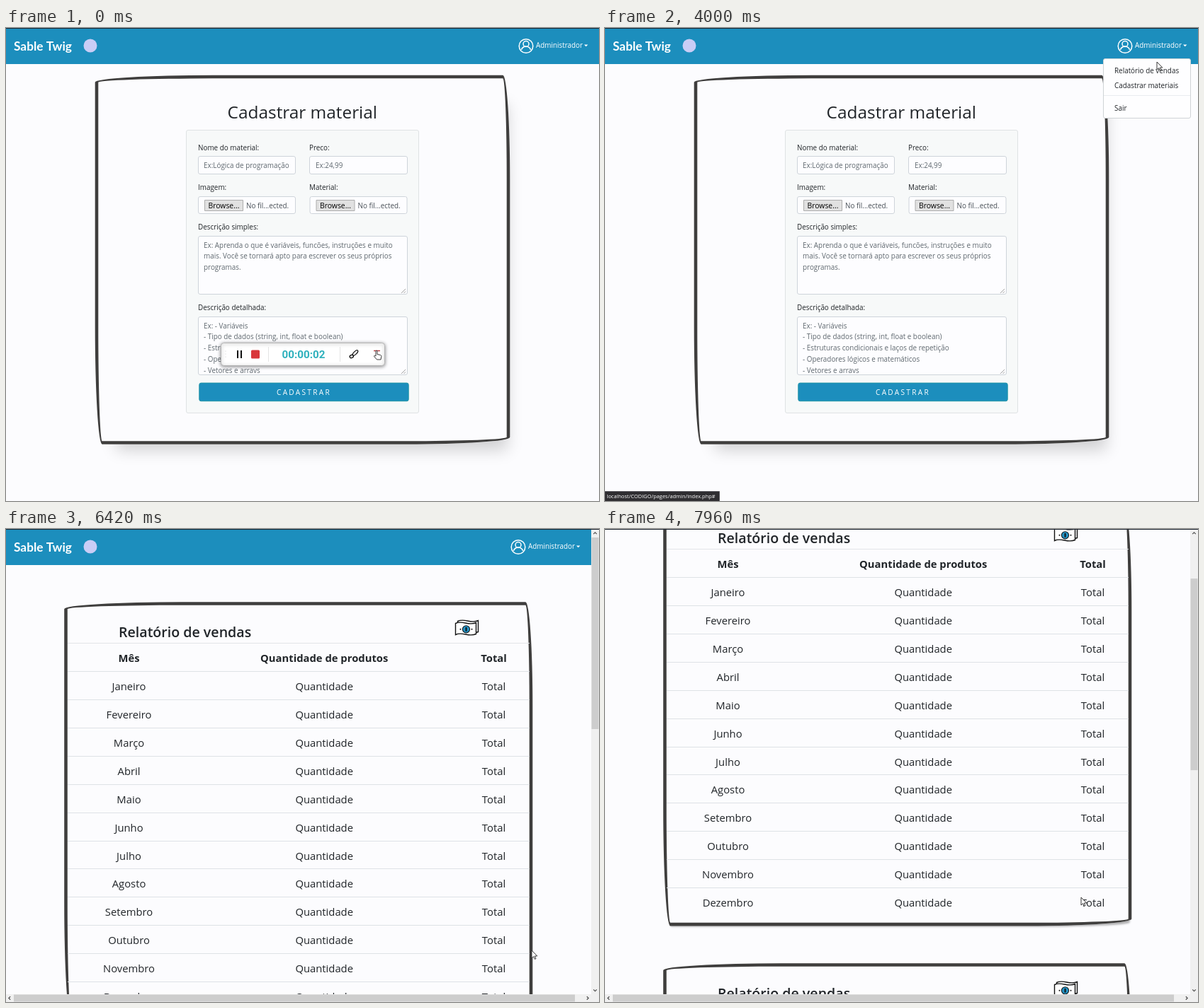
An HTML page with a canvas that plays this animation: 837x669 px, repeating every 8000 ms.

```html
<!DOCTYPE html>
<html lang="pt-BR">
<head>
<meta charset="utf-8">
<title>Painel administrativo</title>
<style>
  html, body { margin: 0; width: 100%; height: 100%; overflow: hidden; background: #fcfcfe; }
  canvas { display: block; }
</style>
</head>
<body>
<canvas id="stage" width="837" height="669"></canvas>
<script>
const ctx = document.getElementById('stage').getContext('2d');
const W = 837, H = 669, LOOP = 8000;
const BLUE = '#1c8ebd', PAGE = '#fcfcfe', INK = '#212529', MUTED = '#5f686f', SKETCH = '#3f3e3d';
const SANS = '"Open Sans", "Noto Sans", sans-serif';
const BODY = 9.88, CELL = 14.8, ROW = 39.85;

// Screen refreshes: first, last, count (evenly spaced)
const REFRESH = [
  [170, 540, 4], [750, 1170, 5], [1380, 1710, 4], [2250, 2840, 6], [3000, 3790, 8],
  [3920, 4000, 2], [4170, 4500, 4], [4710, 4960, 3], [5130, 5130, 1], [5290, 5290, 1],
  [5460, 5840, 4], [6000, 6000, 1], [6210, 6210, 1], [6420, 6420, 1], [6630, 6630, 1],
  [6880, 6880, 1], [7500, 7500, 1], [7750, 7750, 1], [7960, 7960, 1]
];

// Pointer path: time, x, y
const POINTER = [
  [0, 523, 456], [540, 523, 456], [750, 530, 448], [1170, 597, 412], [1710, 690, 246],
  [2130, 690, 246], [2486, 768, 66], [2604, 776, 42], [2840, 785, 24], [3790, 785, 32],
  [4000, 779, 48], [4250, 778, 57], [4500, 774, 58], [5290, 774, 58], [5460, 774, 66],
  [5840, 772, 250], [6000, 785, 425], [6210, 748, 585], [6420, 742, 596], [6630, 742, 600],
  [6880, 672, 521], [8000, 672, 521]
];

const STATUS = [
  [0, ''], [2720, 'localhost/CODIGO/pages/admin/index.php#'],
  [4250, 'localhost/CODIGO/pages/admin/vendas.php'],
  [4710, 'Aguardando localhost...', 172],
  [4830, 'Transferindo dados de localhost...', 172],
  [4960, 'Leu code.jquery.com', 172],
  [5130, 'Leu stackpath.bootstrapcdn.com', 172], [5290, '']
];

const MONTHS = ['Janeiro', 'Fevereiro', 'Março', 'Abril', 'Maio', 'Junho', 'Julho',
  'Agosto', 'Setembro', 'Outubro', 'Novembro', 'Dezembro'];

function heldTime(t) {
  let last = 0;
  for (const [a, b, n] of REFRESH)
    for (let i = 0; i < n; i++) {
      const s = n > 1 ? a + (b - a) * i / (n - 1) : a;
      if (s <= t) last = s;
    }
  return last;
}

function pointerAt(t) {
  const i = POINTER.findIndex(k => k[0] > t);
  const [t0, x0, y0] = POINTER[i - 1], [t1, x1, y1] = POINTER[i];
  const k = (t - t0) / (t1 - t0);
  return [Math.round(x0 + (x1 - x0) * k), Math.round(y0 + (y1 - y0) * k)];
}

function text(str, x, y, o = {}) {
  ctx.font = `${o.weight || 400} ${o.size || BODY}px ${o.font || SANS}`;
  ctx.fillStyle = o.color || INK;
  ctx.textAlign = o.align || 'left';
  ctx.letterSpacing = o.spacing || '0px';
  ctx.fillText(str, x, y);
  ctx.letterSpacing = '0px';
}

function rect(x, y, w, h, color) {
  ctx.fillStyle = color;
  ctx.fillRect(x, y, w, h);
}

function panel(x, y, w, h, r, fill, border) {
  ctx.beginPath();
  ctx.roundRect(x + .5, y + .5, w - 1, h - 1, r);
  ctx.fillStyle = fill;
  ctx.fill();
  ctx.lineWidth = 1;
  ctx.strokeStyle = border;
  ctx.stroke();
}

function stroke(color, width, draw) {
  ctx.beginPath();
  draw();
  ctx.strokeStyle = color;
  ctx.lineWidth = width;
  ctx.stroke();
}

function line(x0, y0, x1, y1, color, width = 1) {
  stroke(color, width, () => { ctx.moveTo(x0, y0); ctx.lineTo(x1, y1); });
}

function disc(x, y, r, color) {
  ctx.beginPath();
  ctx.arc(x, y, r, 0, Math.PI * 2);
  ctx.fillStyle = color;
  ctx.fill();
}

// Box with uneven elliptical corners, optionally inset
function wobbly(x, y, w, h, inset = 0) {
  const q = Math.PI / 2, r = v => Math.max(0, v - inset);
  const long = r(166), mid = r(146), short = r(10);
  x += inset; y += inset; w -= 2 * inset; h -= 2 * inset;
  ctx.moveTo(x + long, y);
  ctx.ellipse(x + w - short, y + mid, short, mid, 0, -q, 0);
  ctx.ellipse(x + w - mid, y + h - short, mid, short, 0, 0, q);
  ctx.ellipse(x + short, y + h - long, short, long, 0, q, 2 * q);
  ctx.ellipse(x + long, y + short, long, short, 0, 2 * q, 3 * q);
  ctx.closePath();
}

function sketchBox(x, y, w, h, [dx, dy, blur, spread, alpha]) {
  const far = 2000;
  ctx.save();
  ctx.shadowColor = `rgba(0,0,0,${alpha})`;
  ctx.shadowBlur = blur;
  ctx.shadowOffsetX = far + dx;
  ctx.shadowOffsetY = dy;
  ctx.beginPath();
  wobbly(x - far, y, w, h, spread);
  ctx.fillStyle = '#000';
  ctx.fill();
  ctx.restore();
  ctx.beginPath();
  wobbly(x, y, w, h);
  ctx.fillStyle = PAGE;
  ctx.fill();
  ctx.beginPath();
  wobbly(x, y, w, h);
  wobbly(x, y, w, h, 4.57);
  ctx.fillStyle = SKETCH;
  ctx.fill('evenodd');
}

function navbar(width) {
  rect(0, 0, width, 51, BLUE);
  text('Sable Twig', 11, 32, { size: 17.3, weight: 700, color: '#fff', font: 'Lato, sans-serif' });
  disc(119, 25, 9.5, '#c9cdf6');
  const x = width - 103;
  stroke('#fff', 1.5, () => ctx.arc(x, 25.5, 9.8, 0, 7));
  stroke('#fff', 1.5, () => ctx.arc(x, 22.5, 4, 0, 7));
  stroke('#fff', 1.5, () => ctx.arc(x, 33, 7, Math.PI * 1.1, Math.PI * 1.9));
  text('Administrador', x + 14, 28, { color: '#fff' });
  ctx.beginPath();
  ctx.moveTo(x + 82, 23.5);
  ctx.lineTo(x + 87.4, 23.5);
  ctx.lineTo(x + 84.7, 26.3);
  ctx.fillStyle = '#fff';
  ctx.fill();
}

function field(x, y, w, h) {
  panel(x, y, w, h, 2.5, '#fdfdff', '#ced4da');
}

function fileField(x) {
  field(x, 238, 138, 25);
  panel(x + 9, 243, 55, 16, 0, '#e1e1e1', '#adadad');
  text('Browse...', x + 36.5, 254.5, { size: 10.4, weight: 500, color: '#000', align: 'center' });
  text('No fil...ected.', x + 68, 254.5, { color: '#495057' });
}

function textarea(y, lines) {
  field(271, y, 296, 83);
  ctx.save();
  ctx.beginPath();
  ctx.rect(272, y, 290, 80);
  ctx.clip();
  lines.forEach((s, i) => text(s, 279, y + 16.7 + i * 15.7, { color: MUTED }));
  ctx.restore();
  line(558, y + 81, 564, y + 75, '#8a8a8a', .8);
  line(561.5, y + 81, 564, y + 78.5, '#8a8a8a', .8);
}

function formPage() {
  navbar(W);
  sketchBox(125.7, 66.8, 585.6, 522, [13, 25, 22, 17, .18]);
  text('Cadastrar material', 418.3, 128.3, { size: 24.4, align: 'center' });
  panel(254, 144, 329, 401, 2.5, '#f7f9f9', '#dfe2e4');
  text('Nome do material:', 271, 172.5);
  text('Preco:', 428, 172.5);
  field(271, 181, 138, 26);
  field(428, 181, 139, 26);
  text('Ex:Lógica de programação', 279, 198, { color: MUTED });
  text('Ex:24,99', 437, 198, { color: MUTED });
  text('Imagem:', 271, 228.5);
  text('Material:', 428, 228.5);
  fileField(271);
  fileField(428.5);
  text('Descrição simples:', 271, 285);
  textarea(294, [
    'Ex: Aprenda o que é variáveis, funcões, instruções e muito',
    'mais. Você se tornará apto para escrever os seus próprios',
    'programas.'
  ]);
  text('Descrição detalhada:', 271, 399);
  textarea(408, [
    'Ex: - Variáveis',
    '- Tipo de dados (string, int, float e boolean)',
    '- Estruturas condicionais e laços de repetição',
    '- Operadores lógicos e matemáticos',
    '- Vetores e arrays'
  ]);
  panel(272.3, 501.6, 296.4, 26.6, 2.5, BLUE, '#2195a6');
  text('CADASTRAR', 382, 519.3, { size: 10.1, color: '#fff', spacing: '2.3px' });
}

function recorder() {
  ctx.save();
  ctx.shadowColor = 'rgba(0,0,0,.45)';
  ctx.shadowBlur = 5;
  ctx.shadowOffsetY = 1;
  panel(303, 445, 232, 33, 4, '#fff', '#b5b5b5');
  ctx.restore();
  for (let i = 0; i < 3; i++) disc(310, 457 + i * 4, .6, '#ccc');
  rect(326, 456, 2, 11, '#111');
  rect(331, 456, 2, 11, '#111');
  ctx.beginPath();
  ctx.roundRect(346, 455.5, 12, 12, 1.5);
  ctx.fillStyle = '#d8373b';
  ctx.fill();
  line(370.5, 451, 370.5, 472, '#e4e4e4');
  line(471.5, 451, 471.5, 472, '#e4e4e4');
  text('00:00:02', 420, 467, { size: 15.2, weight: 700, color: '#2fb1bd', align: 'center', font: 'Roboto, sans-serif' });
  stroke('#111', 1.3, () => ctx.ellipse(493, 459.5, 4.8, 2, -Math.PI / 4, 0, 7));
  stroke('#111', 1.3, () => ctx.ellipse(487.8, 464.5, 2.7, 2, -.4, 0, 7));
  line(519, 456.5, 528, 456.5, '#b8474a', 1.5);
}

function dropdown() {
  panel(703, 43, 124, 85, 2.5, '#fefeff', '#cfd3d6');
  text('Relatório de vendas', 719, 63.5);
  text('Cadastrar materiais', 719, 84.5);
  line(704, 95.5, 826, 95.5, '#e9ecef');
  text('Sair', 719, 116.5);
}

function banknote(x, y) {
  const wave = (dx, dy) => {
    ctx.beginPath();
    ctx.moveTo(x + dx, y + dy + 3);
    ctx.bezierCurveTo(x + dx + 10, y + dy - 2, x + dx + 18, y + dy + 7, x + dx + 29, y + dy + 2);
    ctx.lineTo(x + dx + 29, y + dy + 18);
    ctx.bezierCurveTo(x + dx + 18, y + dy + 23, x + dx + 10, y + dy + 14, x + dx, y + dy + 19);
    ctx.closePath();
    ctx.fillStyle = '#fff';
    ctx.fill();
    ctx.strokeStyle = '#111';
    ctx.lineWidth = 1.4;
    ctx.stroke();
  };
  wave(3.5, -.5);
  wave(.5, 2.5);
  disc(x + 15.5, y + 13.8, 5.6, '#111');
  disc(x + 15.5, y + 13.8, 4.6, '#2492c4');
  line(x + 15.5, y + 11, x + 15.5, y + 16.6, '#111', 2);
  disc(x + 7.5, y + 13.8, 1, '#111');
  disc(x + 23.5, y + 13.8, 1, '#111');
}

function report(top) {
  sketchBox(82.2, top + .2, 661.1, 591.2, [1.3, 5.2, 2.6, 4, .3]);
  text('Relatório de vendas', 159, top + 50.4, { size: 19.6, weight: 600 });
  banknote(634, top + 25);
  const row = (cells, y, weight) => cells.forEach((s, i) =>
    text(s, [173.5, 449.2, 688.5][i], y, { size: CELL, weight, align: 'center' }));
  line(87, top + 58.5, 739, top + 58.5, '#e3e5e8');
  row(['Mês', 'Quantidade de produtos', 'Total'], top + 85.2, 700);
  MONTHS.forEach((m, i) => {
    const y = top + Math.floor(98.9 + i * ROW) + .5;
    line(87, y, 739, y, '#dee2e6');
    row([m, 'Quantidade', 'Total'], top + 125.4 + i * ROW);
  });
}

function chevron(x, y, angle) {
  ctx.save();
  ctx.translate(x, y);
  ctx.rotate(angle);
  stroke('#505050', 1.2, () => { ctx.moveTo(-2.3, 1.2); ctx.lineTo(0, -1.2); ctx.lineTo(2.3, 1.2); });
  ctx.restore();
}

function scrollbars(scroll) {
  rect(826, 0, 11, H, '#f0f0f0');
  rect(0, 658, W, 11, '#f0f0f0');
  rect(826.5, 12 + scroll * .437, 10, 271, '#cdcdcd');
  rect(11, 658.5, 792, 10, '#cdcdcd');
  chevron(831.5, 6, 0);
  chevron(831.5, 652.5, Math.PI);
  chevron(5, 663.5, -Math.PI / 2);
  chevron(821, 663.5, Math.PI / 2);
}

function reportPage(scroll) {
  ctx.save();
  ctx.beginPath();
  ctx.rect(0, 0, 826, 658);
  ctx.clip();
  ctx.translate(0, -scroll);
  navbar(826);
  report(103);
  report(747);
  ctx.restore();
  scrollbars(scroll);
}

function statusBar(t) {
  const [, label, width = 162] = STATUS.filter(s => s[0] <= t).pop();
  if (!label) return;
  panel(-2, 655, width + 2, 16, 0, '#2f2e31', '#55545a');
  text(label, 2.5, 665.2, { size: 7.45, color: '#fff' });
}

const ARROW = new Path2D('M0 0V11L2.6 8.6 4.3 12.4 6 11.7 4.3 8H7.8Z');
const HAND = new Path2D('M3 8V1.2a1 1 0 0 1 2 0V5.5l4.5 1q1.5.4 1.3 2L10 13H4.5L.6 8.6q-.4-1.2.8-1.2z');

function pointer(t) {
  const [x, y] = pointerAt(t);
  const hand = t < 540 || (t > 2700 && t < 3920) || (t > 4100 && t < 4500);
  const shape = hand ? HAND : ARROW;
  ctx.save();
  ctx.translate(hand ? x - 4 : x, y);
  ctx.fillStyle = '#fff';
  ctx.fill(shape);
  ctx.strokeStyle = '#222';
  ctx.lineWidth = .9;
  ctx.stroke(shape);
  ctx.restore();
}

function draw(t) {
  rect(0, 0, W, H, PAGE);
  if (t < 5290) {
    formPage();
    if (t < 540) recorder();
    if (t >= 3400 && t < 4500) dropdown();
  } else {
    reportPage(t < 7500 ? 0 : t < 7750 ? 10 : t < 7960 ? 75 : 133);
  }
  rect(0, 0, W, 1, '#1d2530');
  statusBar(t);
  pointer(t);
}

const start = performance.now();
function tick() {
  draw(heldTime((performance.now() - start) % LOOP));
  requestAnimationFrame(tick);
}
tick();
</script>
</body>
</html>
```
